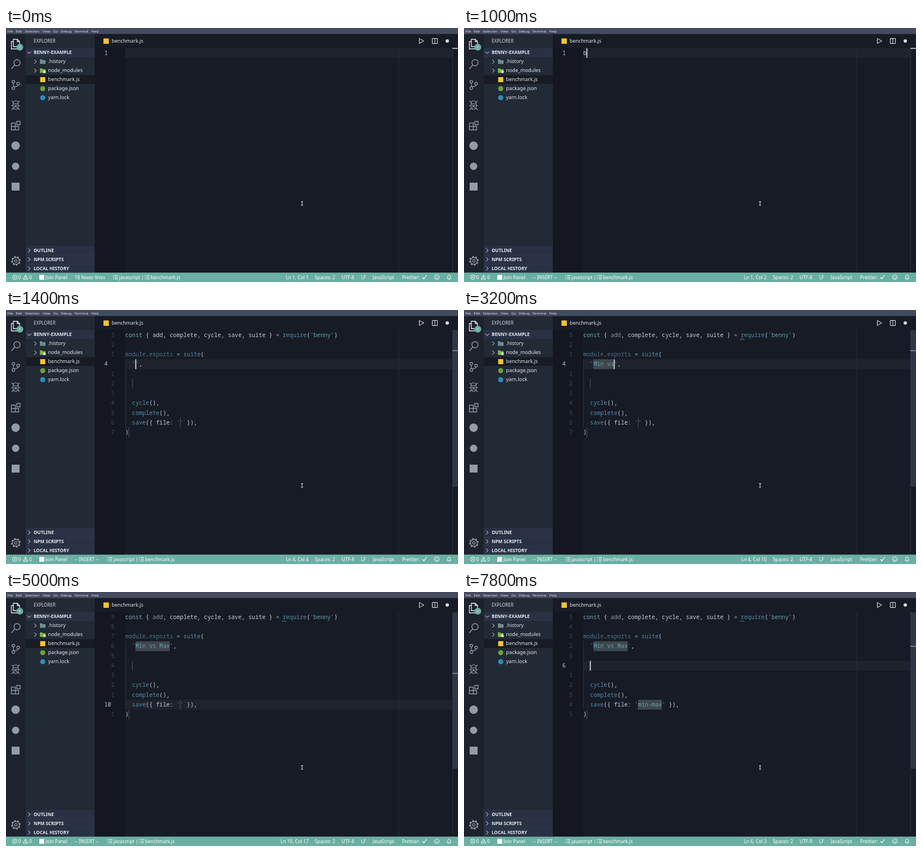
Write an HTML page with a canvas that moves like this. It is 800 px wide and 450 px high and loops after 8 s.

```html
<!DOCTYPE html>
<html lang="en">
<head>
<meta charset="utf-8">
<title>Editor session</title>
<style>
  html, body { margin: 0; width: 100%; height: 100%; overflow: hidden; background: #171b25; }
  canvas { display: block; width: 800px; height: 450px; }
</style>
</head>
<body>
<canvas id="stage" width="800" height="450"></canvas>
<script>
const ctx = document.getElementById('stage').getContext('2d');
const LOOP = 8000, STEP = 200;
const UI = '"Noto Sans", sans-serif', MONO = '"Noto Sans Mono", monospace';
const CODE_SIZE = 10.1, CHAR = CODE_SIZE * 0.6, LEFT = 211, ROW = 17.27, TOP = 35.6;
const C = {
  plain: '#c3cedd', dim: '#8795a3', key: '#6ca6ae', call: '#528ba8', word: '#4d7187',
  string: '#62a2aa', quote: '#578a91', icon: '#949ba8', light: '#e4e8ee',
  teal: '#6aafa2', yellow: '#f7c52d', mark: '#3f474f', thin: '#4c535e', popup: '#2c3444'
};

// ---------- drawing helpers ----------
function rect(x, y, w, h, color) {
  ctx.fillStyle = color;
  ctx.fillRect(x, y, w, h);
}
function dot(x, y, r, color) {
  ctx.fillStyle = color;
  ctx.beginPath();
  ctx.arc(x, y, r, 0, 7);
  ctx.fill();
}
function line(path, color, width = 1) {
  ctx.strokeStyle = color;
  ctx.lineWidth = width;
  ctx.stroke(new Path2D(path));
}
function shape(path, color) {
  ctx.fillStyle = color;
  ctx.fill(new Path2D(path));
}
const ring = (x, y, r) => `M${x - r} ${y}a${r} ${r} 0 1 0 ${2 * r} 0a${r} ${r} 0 1 0 ${-2 * r} 0`;

function text(s, x, y, { size = 8.85, color = C.light, weight = 400, font = UI, align = 'left' } = {}) {
  ctx.font = `${weight} ${size}px ${font}`;
  ctx.fillStyle = color;
  ctx.textAlign = align;
  ctx.fillText(s, x, y);
}
// Monospaced run made of alternating strings and colours.
function code(x, y, ...parts) {
  for (let i = 0; i < parts.length; i += 2) {
    text(parts[i], x, y, { size: CODE_SIZE, color: parts[i + 1], font: MONO });
    x += parts[i].length * CHAR;
  }
}
const rowTop = row => TOP + row * ROW;
const baseline = row => 47.5 + row * ROW;
const colX = col => LEFT + (col - 1) * CHAR;

// ---------- timeline ----------
const TITLE = 'Min vs Max', FILE = 'min-max';
const INSERT = 580, SNIPPET = 1380, HINTS = 1780, TO_FILE = 4480, TO_BODY = 6680;
const titleKeys = [2580, 2780, 2900, 2980, 3100, 3180, 3380, 3500, 3580, 3780];
const fileKeys = [5180, 5300, 5380, 5500, 5580, 5680, 5700];
const wordKeys = [980, 1100, 1180];
const allKeys = [INSERT, ...wordKeys, SNIPPET, ...titleKeys, TO_FILE, ...fileKeys, TO_BODY];
const pressed = (keys, t) => keys.filter(k => k <= t).length;

function stateAt(t) {
  const lastKey = Math.max(-700, ...allKeys.filter(k => k <= t));
  const s = {
    insert: t >= INSERT, snippet: t >= SNIPPET, hints: t >= HINTS,
    word: 'ben'.slice(0, pressed(wordKeys, t)),
    title: TITLE.slice(0, pressed(titleKeys, t)),
    file: FILE.slice(0, pressed(fileKeys, t)),
    cursorOn: (t - lastKey) % 1000 < 500
  };
  if (!s.snippet) [s.line, s.col] = [1, 1 + s.word.length];
  else if (t < TO_FILE) [s.line, s.col] = [4, 4 + s.title.length];
  else if (t < TO_BODY) [s.line, s.col] = [10, 17 + s.file.length];
  else [s.line, s.col] = [6, 3];
  return s;
}

// ---------- window chrome ----------
function drawMenu() {
  rect(0, 0, 800, 10.5, '#454b5e');
  [['File', 2.5], ['Edit', 17.5], ['Selection', 33.5], ['View', 65], ['Go', 84],
   ['Debug', 97], ['Terminal', 121], ['Help', 151]]
    .forEach(([s, x]) => text(s, x, 7.6, { size: 6, color: '#dfe3ea' }));
}

function drawActivityBar() {
  rect(0, 10.5, 35, 423, '#1d222d');
  line('M13 20h7l4 4v9H13zM20 20v4h4M13 24H9.500v13h10.500v-4', C.light, 1.3);
  dot(24.500, 34, 6, C.teal);
  text('1', 24.500, 36.8, { size: 7.5, align: 'center' });
  line(ring(19.500, 61.500, 5.500) + 'M15.500 65.500L9.500 72.500', C.icon, 1.4);
  line(ring(13, 95, 2.4) + ring(13, 106.500, 2.4) + ring(21.500, 98.500, 2.4) +
       'M13 97.500v6.500M21.500 101q0 3-8.500 3', C.icon, 1.3);
  line('M12.500 134q0-5 4.500-5t4.500 5v5q0 5-4.500 5t-4.500-5zM13 134h8M10 129l3 3M24 129l-3 3' +
       'M9 137.500h3.500M21.500 137.500H25M10 145l3-3M24 145l-3-3M14.500 136l5 5M19.500 136l-5 5', C.icon, 1.2);
  line('M9.500 168.500h7v12h-7zM9.500 174.500h13v6h-13M19 165.500h6v6h-6z', C.icon, 1.3);
  dot(17, 208.500, 7.5, C.icon);
  dot(17, 245, 6.5, C.icon);
  rect(10, 274, 14, 14, C.icon);
  ctx.setLineDash([3, 2.890]);
  line(ring(17.500, 412.500, 7.5), C.icon, 2);
  ctx.setLineDash([]);
  line(ring(17.500, 412.500, 6) + ring(17.500, 412.500, 2.3), C.icon, 1.3);
}

const chevronRight = (x, y) => line(`M${x - 1.8} ${y - 3.5}l3.500 3.500l-3.500 3.500`, C.light, 1);

function folder(y, color) {
  shape(`M60 ${y - 4}h4l1 1.500h5v6.500h-10z`, color);
}

function drawSidebar() {
  rect(35, 10.5, 122, 423, '#222a36');
  text('EXPLORER', 49, 26, { size: 8, color: '#d3d8e0' });
  rect(35, 35.5, 122, 16, '#293244');
  line('M37.500 41.800l3.500 3.500l3.500-3.500', C.light, 1);
  text('BENNY-EXAMPLE', 49, 46.4, { size: 8, weight: 700 });
  rect(35, 83.5, 122, 15.5, '#171b24');
  ['.history', 'node_modules', 'benchmark.js', 'package.json', 'yarn.lock']
    .forEach((s, i) => text(s, 74.5, 62.4 + 16 * i));
  chevronRight(52, 59.5);
  chevronRight(52, 75.5);
  folder(59.5, '#6f8b96');
  folder(75.5, '#7cb342');
  dot(68, 77.5, 2.5, '#dcedc8');
  rect(60.5, 87, 9, 9, C.yellow);
  dot(65, 107.5, 4.5, '#6f9f3c');
  dot(65, 123.5, 4.5, '#2c8ebb');
  rect(35, 386, 122, 48, '#293244');
  ['OUTLINE', 'NPM SCRIPTS', 'LOCAL HISTORY'].forEach((s, i) => {
    const y = 394 + 16 * i;
    if (i) rect(35, y - 8, 122, 0.6, '#323c4e');
    chevronRight(41, y);
    text(s, 49, y + 3, { size: 8, weight: 700 });
  });
}

function drawTabs() {
  rect(172.5, 18.5, 9.5, 9.5, C.yellow);
  text('benchmark.js', 187, 26);
  line('M731.500 18.500v9l8-4.500z', C.light, 1);
  line('M754.500 18.500h9v9h-9zM759 18.500v9', C.light, 1);
  dot(781, 23, 3, '#d5d9e0');
}

function listIcon(x) {
  line(`M${x + 3} 438.500h5.500M${x + 3} 441.500h5.500M${x + 3} 444.500h5.500` +
       `M${x} 438.500h1.500M${x} 441.500h1.500M${x} 444.500h1.500`, '#fff', 1);
}

function drawStatus(s) {
  const say = (label, x, align) => text(label, x, 444.5, { size: 8.3, color: '#fff', align });
  rect(0, 433.5, 800, 16.5, C.teal);
  line(ring(15.500, 441.500, 4) + 'M13.700 439.700l3.600 3.600M17.300 439.700l-3.600 3.600', '#fff', 0.9);
  line('M34.500 437.500l4 7.500h-8zM34.500 440v2.500M34.500 443.300v.8', '#fff', 0.9);
  say('0', 21.5);
  say('0', 41);
  rect(59, 437.5, 8.5, 8.5, '#fff');
  say('Join Panel', 70);
  say(s.insert ? '-- INSERT --' : '18 fewer lines', 121.5);
  const x = s.insert ? 179.5 : 189.5;
  listIcon(x);
  say('javascript |', x + 10.5);
  listIcon(x + 56);
  say('benchmark.js', x + 66.5);
  say(`Ln ${s.line}, Col ${s.col}`, 535.5, 'right');
  say('Spaces: 2', 546.5);
  say('UTF-8', 594);
  say('LF', 628.5);
  say('JavaScript', 649);
  say('Prettier:', 701);
  line('M737 441.500l2.500 3l5-6.500', '#fff', 1.2);
  line(ring(762.500, 441.500, 4.2) + 'M760 442.500q2.500 3 5 0M761 439.500v1.200M764 439.500v1.200', '#fff', 0.9);
  line('M780.500 444q1.500-1 1.500-4q0-2.500 2.200-2.500t2.200 2.500q0 3 1.600 4zM783.300 445.500h2', '#fff', 0.9);
}

// ---------- editor ----------
function drawSnippet(s) {
  const field = (row, col, value) => {
    const w = Math.max(1, value.length * CHAR);
    rect(colX(col), rowTop(row), w, ROW, value ? C.mark : C.thin);
  };
  rect(LEFT, rowTop(3), 1, ROW * 7, '#2a303b');
  field(3, 4, s.title);
  field(9, 17, s.file);
  field(5, 3, '');
  field(10, 2, '');
  const put = (row, col, ...parts) => code(colX(col), baseline(row), ...parts);
  put(0, 1, 'const ', C.key, '{ ', C.plain, 'add', s.hints ? C.dim : C.plain,
      ', complete, cycle, save, suite } ', C.plain, '= ', C.key, 'require', C.call,
      '(', C.plain, "'benny'", C.string, ')', C.plain);
  put(2, 1, 'module', C.word, '.', C.plain, 'exports ', C.word, '= ', C.key, 'suite', C.call, '(', C.plain);
  put(3, 3, "'", C.quote, s.title, C.string, "'", C.quote, ',', C.plain);
  put(7, 3, 'cycle', C.call, '(),', C.plain);
  put(8, 3, 'complete', C.call, '(),', C.plain);
  put(9, 3, 'save', C.call, '({ file: ', C.plain, "'", C.quote, s.file, C.string, "'", C.quote, ' }),', C.plain);
  put(10, 1, ')', C.plain);
  if (s.hints) for (let i = 0; i < 3; i++) rect(489 + i * 2.7, 51, 1.3, 1.3, '#a6adb8');
}

function drawEditor(s) {
  rect(157, 10.5, 643, 423, '#171b25');
  rect(157, 35.5, 54, 398, '#14171f');
  drawTabs();
  rect(LEFT, rowTop(s.line - 1), 579, ROW, '#1e232e');
  rect(694.5, 35.5, 1, 398, '#282d38');
  rect(790, 35.5, 1, 398, '#282d38');
  if (s.snippet) rect(790, 36, 10, 277, '#2d364a');
  rect(790, 35.3 + (s.line - 1) * 12, 10, 1.6, s.snippet ? '#8992a2' : '#c9ced6');

  for (let n = 1; n <= (s.snippet ? 11 : 1); n++) {
    const current = n === s.line;
    text(current ? n : Math.abs(n - s.line), current ? 174 : 192, baseline(n - 1), {
      size: CODE_SIZE, font: MONO, color: current ? '#bcc3ce' : '#3d4655', align: current ? 'left' : 'right'
    });
  }
  if (s.snippet) drawSnippet(s);
  else code(LEFT, baseline(0), s.word, C.plain);
  if (s.cursorOn) rect(colX(s.col) - 0.3, rowTop(s.line - 1), s.insert ? 1.5 : CHAR, ROW, '#eef1f5');
}

// ---------- suggestions ----------
// Kind letter, then a label whose matched letters sit between asterisks.
const suggestions = [
  's*ben*ny', 'v*Be*foreU*n*loadEvent', 'm*b*as*en*ame', 'v*B*yteL*en*gthQueuingStrategy',
  'v*B*ool*e*a*n*', 'vSVGFEFunc*BE*leme*n*t', 'v*B*iquadFilt*e*r*N*ode', 'c*B*AD*N*AM*E*',
  'v*B*as*e*AudioCo*n*text', 'mis*B*ool*e*a*n*', 'vAudio*B*ufferSourc*eN*ode', 'cZ_*BE*ST_COMPRESSIO*N*'
];

function kindIcon(kind, y) {
  if (kind === 's') line(`M235.500 ${y - 4}h8v8h-8z`, '#a9b1be', 0.9);
  if (kind === 'm') line(`M239.500 ${y - 4.5}l4 2v5l-4 2l-4-2v-5zM235.500 ${y - 2.5}l4 2l4-2M239.500 ${y - .5}v5`, '#a9b1be', 0.9);
  if (kind === 'c') line(`M235 ${y - 3.5}h9v7h-9zM237 ${y - 1}h5M237 ${y + 1.200}h5`, '#a9b1be', 0.9);
  if (kind === 'v') {
    line(`M236 ${y - 3}h-1.500v6h1.500M243 ${y - 3}h1.500v6h-1.500`, '#a9b1be', 0.9);
    line(`M237.500 ${y - 1}l2-1l2 1v2l-2 1l-2-1zM237.500 ${y - 1}l2 1l2-1`, '#5fb4ea', 1);
  }
}

function drawPopup() {
  rect(229, 53, 475, 207.5, C.popup);
  rect(230, 53.5, 229, 17, '#3f4c63');
  rect(459, 53.5, 7, 124.5, '#414d62');
  rect(697, 53.5, 7, 165, '#414d62');
  suggestions.forEach((entry, i) => {
    const y = 62 + i * ROW;
    let x = 247;
    kindIcon(entry[0], y);
    entry.slice(1).split('*').forEach((part, j) => {
      text(part, x, y + 3.5, {
        size: CODE_SIZE, font: MONO, color: j % 2 ? '#72bcae' : C.plain, weight: j % 2 ? 700 : 400
      });
      x += part.length * CHAR;
    });
  });

  ctx.save();
  ctx.beginPath();
  ctx.rect(467, 53, 236, 207);
  ctx.clip();
  const put = (y, ...parts) => code(471, y, ...parts);
  put(68.5, 'Log output to console (User Snippe', C.plain);
  put(85.5, 't)', C.plain);
  put(114, 'const ', C.key, '{ add, complete, cycle, save,', C.plain);
  put(131, 'suite } ', C.plain, '= ', C.key, 'require', C.call, '(', C.plain, "'benny'", C.string, ')', C.plain);
  put(165, 'module', C.word, '.', C.plain, 'exports ', C.word, '= ', C.key, 'suite', C.call, '(', C.plain);
  put(182, "  ''", C.string, ',', C.plain);
  put(250.5, '  cycle', C.call, '(),', C.plain);
  put(267.5, '  complete', C.call, '(),', C.plain);
  ctx.restore();

  line('M688 59.500l5.500 5.500M693.500 59.500l-5.500 5.500', '#aab2bf', 0.9);
  line('M229.500 53.500h474v206.500h-474zM466.500 53.500v206.500', '#4b5971', 1);
}

function render(t) {
  const s = stateAt(t);
  drawEditor(s);
  drawActivityBar();
  drawSidebar();
  drawMenu();
  drawStatus(s);
  if (s.word === 'ben' && !s.snippet) drawPopup();
  line('M522.300 307.500h3.400M522.300 314h3.400M524 307.500v6.500', '#e8ebf0', 1);
}

const start = performance.now();
function tick() {
  const t = (performance.now() - start) % LOOP;
  render(Math.floor(t / STEP) * STEP);
  requestAnimationFrame(tick);
}
tick();
</script>
</body>
</html>
```
